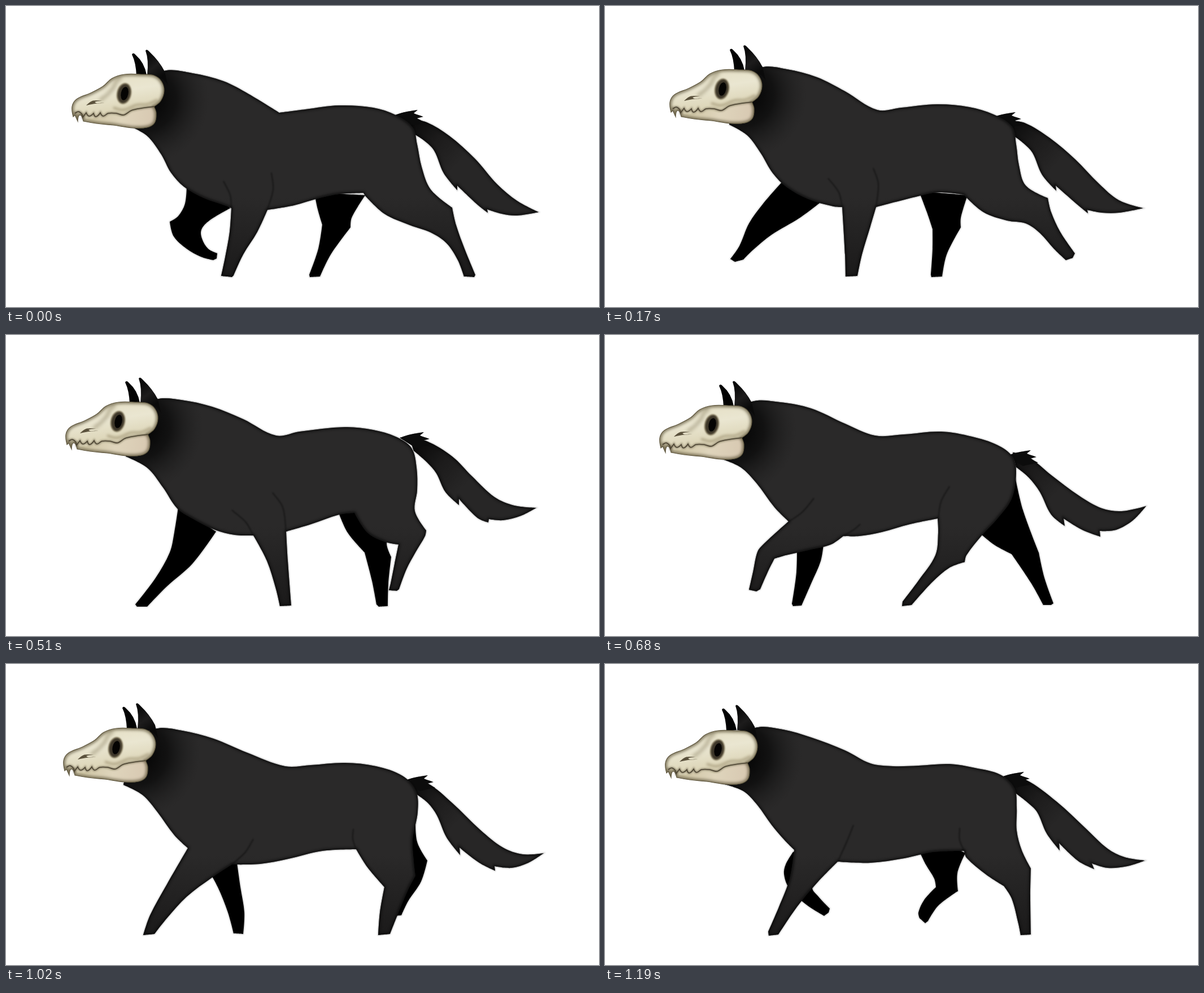
Recreate the animation shown at these times as an HTML page with a canvas. Size 1050 by 533 pixels, loop 1.36 s.

```html
<!DOCTYPE html>
<html>
<head>
<meta charset="utf-8">
<title>Walk cycle</title>
<style>
html, body { margin: 0; width: 100%; height: 100%; overflow: hidden; background: #fff; }
canvas { display: block; }
</style>
</head>
<body>
<canvas id="stage" width="1050" height="533"></canvas>
<script>
const ctx = document.getElementById('stage').getContext('2d');
const STEP = 170;

// Smooth curve through "x,y" points; a star marks a sharp corner.
function curve(text, closed = true) {
  const pts = text.trim().split(/\s+/).map(s => {
    const [x, y] = s.split(',').map(parseFloat);
    return { x, y, sharp: s.endsWith('*') };
  });
  const n = pts.length, path = new Path2D();
  const at = i => closed ? pts[(i + n) % n] : pts[Math.max(0, Math.min(n - 1, i))];
  const handle = (i, len) => {
    const p = at(i), a = at(i - 1), b = at(i + 1);
    const d = Math.hypot(b.x - a.x, b.y - a.y) || 1;
    const k = p.sharp ? 0 : len / 3 / d;
    return [(b.x - a.x) * k, (b.y - a.y) * k];
  };
  path.moveTo(pts[0].x, pts[0].y);
  for (let i = 0; i < (closed ? n : n - 1); i++) {
    const p = at(i), q = at(i + 1), len = Math.hypot(q.x - p.x, q.y - p.y);
    const [ux, uy] = handle(i, len), [vx, vy] = handle(i + 1, len);
    path.bezierCurveTo(p.x + ux, p.y + uy, q.x - vx, q.y - vy, q.x, q.y);
  }
  if (closed) path.closePath();
  return path;
}

// head, ears and tuft are offsets from the first pose
const poses = [
  {
    head: [0, 0], ears: [0, 0], tuft: [0, 0],
    body: `280,115 330,119 385,133 430,156 484,189* 530,183 590,176 650,180 690,193 720,215 728,245 736,285 752,325 790,357*
      797,388 812,430 831,476* 829,480* 811,479* 800,450 780,420 752,401 715,388 670,368 636,336* 633,331* 590,333 555,340 510,353 463,361*
      445,400 420,440 403,477* 400,480* 381,478* 388,445 396,400 399,358* 390,354 350,340 315,320 292,295 275,263 250,230 220,213* 240,140*`,
    fore: '320,318* 317,350 305,372 290,382* 297,408 320,430 345,444 367,450* 373,447* 374,438* 358,430 347,412 346,396 360,380 397,358* 360,320*',
    hind: '546,330* 552,360 560,387* 553,430 537,476* 538,480* 556,479* 575,440 610,392* 612,375 636,335*',
    tail: '715,200* 745,206 785,230 830,270 870,316 905,345 943,365* 905,371 878,368 852,360* 853,366* 835,352 799,318* 799,326* 775,296 758,256 740,238 718,224*',
    folds: ['399,358 397,335 385,310', '463,360 473,325 470,295']
  },
  {
    head: [-2, -8], ears: [-2, -8], tuft: [-2, 4],
    body: `276,109 322,112 375,126 425,151 482,184 525,180 588,174 645,179 688,192 721,214 728,245 733,282 745,318 784,340*
      790,365 806,400 832,438* 828,446* 816,450* 795,430 770,402 745,385 712,380 670,365 635,334* 590,330 550,338 480,356*
      470,390 455,440 447,478* 426,479* 425,440 420,356* 405,355 360,342 322,321 297,296 276,261 252,229 220,210* 238,135*`,
    fore: '315,310* 280,350 255,385 238,425 222,448* 230,453* 245,449* 262,432 295,405 345,375 385,345*',
    hind: '556,328* 570,365 580,395* 580,430 577,476* 578,480* 597,479* 605,440 630,392* 630,375 642,335*',
    tail: '713,203* 743,207 788,234 832,271 875,315 910,344 953,358* 910,366 880,366 854,361* 855,367* 838,353 798,318* 799,327* 774,299 757,260 741,243 721,228*',
    folds: ['420,356 414,330 395,305', '480,356 484,315 475,287']
  },
  {
    head: [-6, -12], ears: [-6, -12], tuft: [-4, 7],
    body: `272,104 315,107 365,120 420,147 478,180 520,177 585,174 640,179 685,192 722,212 727,245 730,280 738,305 752,315 771,322*
      778,345 800,378 832,405* 830,420* 823,424* 800,414 770,397 742,366* 715,366 685,358 650,338 633,327* 590,328 545,336 496,350*
      494,370 491,420 485,478* 464,480* 461,470 455,410 440,355* 410,354 370,344 330,323 303,298 278,260 255,228 220,207* 235,130*`,
    fore: '312,305* 285,355 255,405 235,445 215,478* 217,481* 234,481* 260,448 310,405 372,345*',
    hind: '566,325* 582,360 605,387* 610,430 616,476* 619,480* 636,479* 640,430 651,393* 645,370 650,335*',
    tail: '712,205* 740,208 790,237 830,270 870,309 908,336 948,347* 910,358 880,360 852,357* 853,364* 835,350 794,314* 795,325* 773,300 755,263 742,248 724,232*',
    folds: ['440,357 430,325 405,300', '496,350 494,305 480,280']
  },
  {
    head: [-11, -2], ears: [-12, -2], tuft: [11, -12],
    body: `266,114 310,115 365,127 420,149 478,178 520,171 600,163 650,168 690,180 718,200 727,235 728,275 724,312 744,346*
      742,356 725,385 709,415 696,450* 692,453* 678,452* 681,440 688,405 695,371* 670,366 640,350 617,315* 590,318 540,335 496,348*
      499,400 505,479* 485,480* 478,450 462,400 438,355* 405,354 370,345 330,325 303,307 278,270 250,235 212,215* 230,140*`,
    fore: '305,305* 298,350 290,385 265,430 229,477* 232,481* 250,481* 285,445 330,405 372,348*',
    hind: '588,312* 605,350 635,385* 648,435 656,477* 660,481* 676,480* 677,440 682,393* 674,370 680,350* 640,315*',
    tail: '715,184* 745,188 790,215 825,250 865,287 900,302 939,306* 912,320 880,328 855,326* 854,332* 835,324 802,290* 802,301* 778,278 762,245 745,225 722,205*',
    folds: ['438,355 425,332 400,310', '496,348 490,305 472,279']
  },
  {
    head: [-20, 4], ears: [-21, 4], tuft: [25, 20],
    body: `260,118 310,119 365,130 425,157 478,178 530,176 595,171 650,180 695,195 722,216 728,245 720,290 695,325 668,354 640,390 637,402*
      610,412 580,437 543,478* 526,480* 527,472* 555,435 585,390 590,350 589,325* 540,335 490,349 450,356 422,356*
      400,371 360,381 320,390 300,396* 288,420 275,450* 268,454* 255,451* 262,420 270,384 280,371 325,330* 300,305 268,262 240,234 205,219* 225,145*`,
    fore: '340,370* 339,420 331,476* 333,480* 348,479* 365,440 382,400 387,370*',
    hind: '727,255* 740,310 768,385* 778,430 794,475* 790,478* 776,478* 755,440 720,388* 690,372 665,352* 700,270*',
    tail: '722,208* 750,216 790,248 840,285 880,307 915,312 958,303* 935,328 905,345 876,347* 877,357* 845,345 812,325* 814,338* 790,318 770,278 750,252 728,234*',
    folds: ['325,331 350,313 370,289', '422,356 440,345 452,335', '590,325 595,295 610,268']
  },
  {
    head: [-20, -3], ears: [-18, -2], tuft: [25, 23],
    body: `260,117 310,120 365,134 425,160 487,181 530,178 590,174 650,181 700,200 724,222 728,255 715,305 697,340 693,382*
      660,410 625,448 602,478* 583,480* 582,474* 605,430 632,380* 612,345 605,325* 550,333 490,350 440,356 396,358*
      345,376 290,405 258,432 240,450* 225,454* 218,450* 232,420 255,378 316,324* 295,303 262,259 235,232 203,216* 225,145*`,
    fore: '345,370* 358,400 366,440 370,478* 374,480* 388,479* 393,440 398,395 396,350*',
    hind: '728,255* 742,300 765,330 789,346* 797,380 825,438* 820,443* 810,446* 785,420 768,388 745,370 715,368 692,360* 700,290*',
    tail: '722,210* 750,220 782,252 830,298 868,322 905,328 951,321* 930,345 895,359 865,360* 866,369* 838,357 803,334* 805,346* 783,320 765,280 748,252 728,235*',
    folds: ['316,324 335,308 345,298', '396,358 420,345 435,335', '605,325 603,305 606,290']
  },
  {
    head: [-15, -7], ears: [-17, -8], tuft: [18, 13],
    body: `264,115 312,118 367,132 427,157 494,181 540,179 600,175 655,181 702,198 726,225 729,262 720,310 722,350 725,375*
      712,400 695,440 680,478* 659,480* 662,440 670,395* 640,360 620,328* 560,331 500,345 450,354 400,355*
      365,378 320,412 285,450 263,478* 243,480* 255,445 285,390 322,326* 298,303 268,262 242,232 208,214* 228,140*`,
    fore: '350,350* 375,395 393,440 403,477* 420,478* 422,440 415,395 408,345*',
    hind: '725,270* 728,315 746,348* 735,385 712,420 700,445* 685,446* 684,430 690,400 695,368* 660,340*',
    tail: '718,205* 748,212 790,246 840,294 880,325 915,337 952,335* 925,352 895,361 865,358* 866,366* 838,352 803,325* 804,338* 780,307 763,268 747,246 726,230*',
    folds: ['400,355 424,333 438,310', '620,328 614,310 615,292']
  },
  {
    head: [-10, -3], ears: [-16, -5], tuft: [13, 7],
    body: `266,113 315,116 365,130 425,153 470,176 510,181 555,180 610,177 655,184 700,196 725,220 729,255 729,295 738,330 754,362*
      753,410 754,479* 736,480* 732,460 720,415 706,393* 675,373 640,343 636,331* 580,333 530,344 470,352 412,350*
      375,388 340,430 307,479* 290,481* 289,474* 308,430 327,380 335,329* 318,312 295,285 270,250 245,225 208,212* 230,140*`,
    fore: '333,333* 320,355 317,372 325,395 355,425 388,446* 396,440* 398,433* 378,412 367,395 385,360* 370,330*',
    hind: '556,330* 568,355 583,380 586,395* 565,418 555,440 557,450* 567,459* 572,455* 590,428 625,402* 624,370 638,335* 620,325*',
    tail: '712,200* 745,205 800,244 850,290 890,327 920,342 956,348* 925,358 890,361 862,353* 866,363* 838,349 804,317* 805,330* 782,300 765,262 748,245 726,228*',
    folds: ['412,350 428,315 440,285', '638,335 628,312 628,290']
  }
];
for (const p of poses) {
  for (const k of ['body', 'fore', 'hind', 'tail']) p[k] = curve(p[k]);
  p.folds = p.folds.map(f => curve(f, false));
}

const tuft = curve('686,194* 705,188 729,184* 722,190* 739,196* 728,199* 742,206* 715,212* 700,203');
const backEar = new Path2D('M231,124Q230,100 223,86Q225,81 230,87Q245,100 249,122Z');
const frontEar = new Path2D('M250,122Q253,95 247,79Q249,75 254,81Q272,98 281,116L287,142Q282,128 262,124Z');
const skull = curve(`117,178 125,165 150,154 172,142 188,128 210,121 240,121 262,123 275,133 280,150 274,168 262,178*
  266,190 263,207 250,215 225,216 190,211 160,208 137,204* 131,193 127,204* 122,193* 119,196*`);
const jaw = curve('140,200* 158,198 182,194 206,196 222,188 240,183 262,179* 266,192 262,207 248,214 225,215 190,210 160,207');
const mouth = curve('122,190 128,187 134,191 136,197* 142,189* 147,195 155,190* 159,196 167,189* 172,195 181,190 195,190 208,193 222,185 240,181 262,178', false);
const nose = curve('142,176* 153,168 170,168* 158,171 174,171* 158,173');
const brow = curve('166,167 178,158 190,145 195,134 204,127', false);
const cheek = curve('190,180 208,184 232,175 250,174 268,166', false);

function line(path, color, width, blur = 0) {
  ctx.filter = blur ? `blur(${blur}px)` : 'none';
  ctx.strokeStyle = color;
  ctx.lineWidth = width;
  ctx.stroke(path);
  ctx.filter = 'none';
}

function fill(path, color) {
  ctx.fillStyle = color;
  ctx.fill(path);
}

function ramp(x0, y0, x1, y1, ...colors) {
  const g = ctx.createLinearGradient(x0, y0, x1, y1);
  colors.forEach((c, i) => g.addColorStop(i / (colors.length - 1), c));
  return g;
}

function inside(path, draw) {
  ctx.save();
  ctx.clip(path);
  draw();
  ctx.restore();
}

function moved([x, y], draw) {
  ctx.save();
  ctx.translate(x, y);
  draw();
  ctx.restore();
}

function fur(path, color, extra) {
  line(path, 'rgba(0,0,0,.25)', 2, 1);
  fill(path, color);
  inside(path, () => {
    line(path, 'rgba(8,8,8,.8)', 5, 2);
    if (extra) extra();
  });
}

function oval(rx, ry, color, dx = 0) {
  ctx.beginPath();
  ctx.ellipse(209 + dx, 155, rx, ry, 0.2, 0, 7);
  ctx.fillStyle = color;
  ctx.fill();
}

function drawSkull() {
  fill(skull, ramp(190, 120, 205, 216, '#e5dfc5', '#eae6d1', '#ddd6b9', '#d4c9ad'));
  inside(skull, () => {
    fill(jaw, ramp(150, 190, 260, 205, '#cfc6a5', '#dfd5bc', '#d8c9b2'));
    line(brow, 'rgba(120,110,80,.5)', 5, 3);
    line(cheek, 'rgba(140,128,95,.55)', 4, 2);
    line(skull, 'rgba(85,75,50,.75)', 6, 2.5);
  });
  line(skull, '#5f573f', 1.2);
  line(mouth, 'rgba(80,70,48,.5)', 4, 1.5);
  line(mouth, '#4b4332', 1.6);
  fill(nose, '#5a513c');
  ctx.filter = 'blur(1px)';
  oval(13, 19, '#8a8064');
  oval(11, 17, '#3d3629');
  ctx.filter = 'none';
  oval(6.5, 12, '#050403', 1);
}

function drawPose(p) {
  ctx.fillStyle = '#fff';
  ctx.fillRect(0, 0, 1050, 533);
  for (const leg of [p.fore, p.hind]) {
    line(leg, 'rgba(0,0,0,.25)', 2, 1);
    fill(leg, '#000');
  }
  fur(p.tail, ramp(715, 200, 800, 280, '#080808', '#1c1b1b', '#272626'));
  moved(p.tuft, () => fill(tuft, '#0c0c0c'));
  fur(p.body, ramp(0, 200, 0, 480, '#2a2929', '#2a2929', '#1b1a1a'), () => {
    moved(p.head, () => {
      const g = ctx.createRadialGradient(245, 165, 25, 245, 165, 115);
      g.addColorStop(0, '#080808');
      g.addColorStop(0.35, 'rgba(12,12,12,.8)');
      g.addColorStop(1, 'rgba(30,30,30,0)');
      ctx.fillStyle = g;
      ctx.fillRect(100, 30, 300, 300);
    });
  });
  for (const f of p.folds) line(f, 'rgba(12,12,12,.6)', 2, 1);
  moved(p.ears, () => {
    fill(backEar, '#030303');
    fill(frontEar, ramp(250, 90, 275, 125, '#0a0a0a', '#1d1c1c', '#0a0a0a'));
  });
  moved(p.head, drawSkull);
}

let shown = -1;
function tick(now) {
  const i = Math.floor(now / STEP) % poses.length;
  if (i !== shown) drawPose(poses[shown = i]);
  requestAnimationFrame(tick);
}
drawPose(poses[shown = 0]);
requestAnimationFrame(tick);
</script>
</body>
</html>
```
